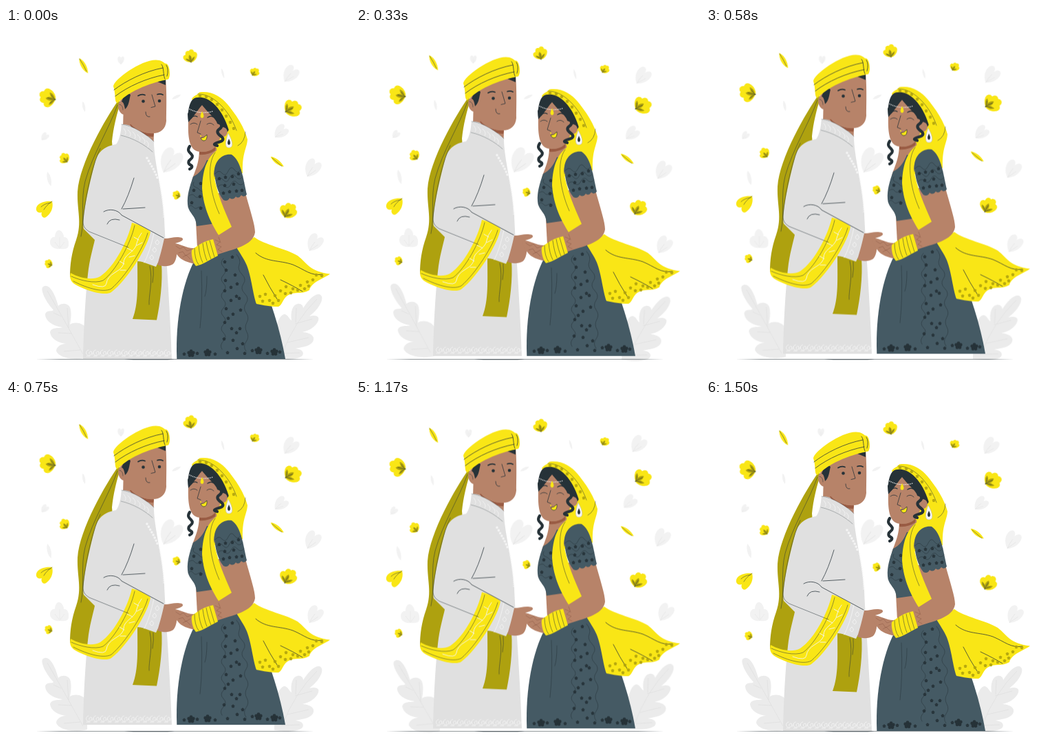
An HTML page that plays this animation: 500x500 px, repeating every 1.54 s.

```html
<!DOCTYPE html>
<html lang="en">
<head>
<meta charset="utf-8">
<title>Wedding couple</title>
<style>
html, body { margin: 0; height: 100%; overflow: hidden; background: #fff; }
svg { display: block; width: 100vw; height: 100vh; }
.sway { transform-origin: 250px 250px; animation: sway 1540ms linear infinite; }
.float { animation: float 1540ms linear infinite; }
@keyframes float {
  0%, 95%, 100% { transform: translateY(0); }
  46.75% { transform: translateY(-9.3px); }
}
@keyframes sway {
  0%, 97.4%, 100% { transform: rotate(0); }
  24.35% { transform: rotate(1.1deg); }
  73.05% { transform: rotate(-1.1deg); }
}
.yellow { fill: #f9e616; }
.olive { fill: #aea10f; }
.skin { fill: #b78369; }
.shade { fill: #995b43; }
.robe { fill: #e0e0e0; }
.dress { fill: #455a64; }
.dark { fill: #263238; }
.line, .fine, .lace, .beads { fill: none; stroke-linecap: round; stroke-linejoin: round; }
.line { stroke: #263238; stroke-width: .75; }
.fine { stroke: #263238; stroke-width: .5; }
.bold { stroke-width: 1.8; }
.curl { stroke-width: 4.2; }
.lace { stroke: #f4f4f4; stroke-width: .9; }
.beads { stroke-dasharray: 0 4.6; stroke-width: 3.6; }
.small { stroke-dasharray: 0 3; stroke-width: 1.8; }
.blooms { fill: none; marker: url(#bloom); }
.buds { fill: none; marker: url(#bud); }
.spots { fill: none; marker: url(#spot); }
</style>
</head>
<body>
<svg viewBox="0 0 500 500">
<defs>
  <g id="five">
    <circle cy="-2" r="1.5"/><circle cx="2" cy="-.6" r="1.5"/><circle cx="1.2" cy="1.7" r="1.5"/>
    <circle cx="-1.2" cy="1.7" r="1.5"/><circle cx="-2" cy="-.6" r="1.5"/><circle r="1"/>
  </g>
  <marker id="bloom" viewBox="-4 -4 8 8" markerWidth="13" markerHeight="13" markerUnits="userSpaceOnUse"><use href="#five" fill="#263238"/></marker>
  <marker id="bud" viewBox="-4 -4 8 8" markerWidth="5.6" markerHeight="5.6" markerUnits="userSpaceOnUse"><use href="#five" fill="#263238"/></marker>
  <marker id="spot" viewBox="-4 -4 8 8" markerWidth="5.4" markerHeight="5.4" markerUnits="userSpaceOnUse"><use href="#five" fill="#aea10f"/></marker>
  <g id="petal">
    <path class="yellow" d="M0 0C-6-1-13-5-13-10C-13-14-10-15-8-15C-9-20-5-23-1-21C1-25 8-24 8-18C13-18 14-13 12-9C10-4 5 0 0 0Z"/>
    <path class="olive" d="M0-1C-5-2-9-5-9-8C-5-8-1-5 0-1ZM0-1C-4-5-4-11-1-14C3-11 3-5 0-1ZM0-1C1-6 4-9 8-10C8-6 5-2 0-1Z"/>
    <path class="fine" d="M0 0Q-1-6 0-11M0 0Q-2-4-6-6M0 0Q2-5 5-7"/>
  </g>
  <g id="heart">
    <path d="M0 0C-8-5-11-14-8-20C-5-25 0-22 0-17C2-24 8-24 9-18C10-11 6-4 0 0Z"/>
    <path fill="none" stroke="#e5e5e5" stroke-width=".6" d="M0 0Q-1-7 0-13M0-1Q3-7 5-12"/>
  </g>
  <path id="sliver" d="M0-12C6-5 5 5 1 12C-5 6-5-6 0-12Z"/>
</defs>

<g class="sway">
  <g fill="#f2f2f2">
    <use href="#heart" transform="translate(405 78) rotate(37) scale(1.15)"/>
    <use href="#heart" transform="translate(229 210) rotate(30) scale(1.65)"/>
    <use href="#heart" transform="translate(391 159) rotate(46) scale(.98)"/>
    <use href="#heart" transform="translate(438 216) rotate(30) scale(1.2)"/>
    <use href="#heart" transform="translate(441 324) rotate(32) scale(1.18)"/>
    <use href="#heart" transform="translate(52 163) rotate(40) scale(.55)"/>
    <use href="#heart" transform="translate(167 53) scale(.52)"/>
    <path d="M78 321C70 322 63 317 64 310C65 304 70 303 71 304C71 297 75 293 78 294C82 296 84 300 84 304C89 303 92 309 91 316C91 321 84 322 78 321Z"/>
    <path fill="none" stroke="#e5e5e5" stroke-width=".6" d="M78 321V304M77 319L71 311M79 319L85 311"/>
    <use href="#sliver" transform="translate(62.5 219.500) rotate(-12) scale(.7 .9)"/>
    <use href="#sliver" transform="translate(113 114.500) rotate(-10) scale(.5 .65)"/>
    <use href="#sliver" transform="translate(315 66) rotate(-14) scale(.4 .62)"/>
    <use href="#sliver" transform="translate(247.500 100) rotate(65) scale(.5 .6)"/>
  </g>
  <g fill="#ebebeb">
    <path d="M56 375C66 373 73 393 76 404C80 400 89 399 93 406C96 414 94 424 93 431C101 426 113 429 118 438V479C102 484 76 480 73 469C74 460 86 458 91 459C77 459 65 452 64 442C66 434 79 437 82 435C67 433 57 425 57 416C59 409 67 413 69 410C60 401 48 380 54 376Z"/>
    <path d="M455 387C464 389 459 405 441 419C452 416 458 420 452 429C446 438 437 440 431 442C444 443 450 449 446 456C440 464 427 464 421 466C432 467 434 473 430 477C420 483 405 482 390 480V444C394 430 397 418 404 416C410 416 412 424 415 425C413 412 417 402 424 401C429 400 432 404 432 407C440 395 447 387 455 387Z"/>
    <path fill="none" stroke="#dedede" stroke-width=".7" d="M60 382Q85 425 112 474M69 414L80 419M76 443L95 444M84 470L108 468M89 407L91 436M452 394Q420 425 401 474M422 407L421 428M445 423L420 430M440 450L409 457M427 472L403 473"/>
  </g>
</g>

<path class="dark" d="M43 481.500L80 481.200H410L448 481.500L410 481.800H245L235 482.300H185L172 481.800H80Z"/>

<g class="float">
  <use href="#petal" transform="translate(72 104) rotate(-78) scale(1.04)"/>
  <use href="#petal" transform="translate(406 122) rotate(62) scale(1.04)"/>
  <use href="#petal" transform="translate(269 50) rotate(-8) scale(.8)"/>
  <use href="#petal" transform="translate(405 275) rotate(30) scale(.98)"/>
  <use href="#petal" transform="translate(89 195) rotate(-37) scale(.62)"/>
  <use href="#petal" transform="translate(253 245) rotate(-68) scale(.5)"/>
  <use href="#petal" transform="translate(67 345) rotate(-66) scale(.5)"/>
  <use href="#petal" transform="translate(358 69) rotate(35) scale(.54)"/>
  <g class="yellow">
    <path d="M67 252C70 263 63 272 58 275C54 278 50 272 52 268C45 270 42 264 45 259C49 253 59 251 67 252Z"/>
    <use href="#sliver" transform="translate(112.500 55) rotate(-28) scale(.9 1.050)"/>
    <use href="#sliver" transform="translate(394 194.500) rotate(-51) scale(.75 1)"/>
  </g>
  <path class="fine" d="M67 252Q59 257 55 264M65 254Q56 255 51 260M107 45Q113 54 117 63M387 189L401 201"/>

  <!-- groom -->
  <path class="olive" d="M164 104C145 131 107 196 104 238C103 266 111 282 102 308C95 328 93 344 93 362L128 370L160 240L154 165C156 145 161 125 166 110Z"/>
  <path class="fine" d="M162 112C150 146 126 183 115 223C108 252 115 275 109 303"/>
  <path class="skin" d="M171 106L170 146L190 164L214 180L215 154Z"/>
  <path class="robe" d="M168 140C182 139 205 153 215 166C215 192 227 236 230 276C231 310 239 410 241 481H112C113 430 116 385 119 358C121 337 127 318 129 308L113 292C110 280 117 242 129 197C134 177 145 172 160 169C165 163 167 151 168 140Z"/>
  <path class="shade" d="M182 139C193 151 205 154 215 153L214 158C200 158 186 150 180 141Z"/>
  <path class="robe" d="M168 140C184 141 206 156 215 165L213 180C200 170 185 161 167 156Z"/>
  <path class="fine" stroke-opacity=".6" d="M168 140C184 141 206 156 215 165M167 156C185 160 202 170 213 180"/>
  <path class="lace" d="M171 146q5 6 2 9m4-7q6 5 3 9m4-6q6 5 3 10m4-6q6 5 3 9m4-5q6 5 3 9m3-4q5 4 2 9" stroke-dasharray="3 1"/>
  <path class="lace beads" d="M205 189C211 200 217 209 221 220"/>
  <path class="lace small" d="M223 224C227 244 229 260 229 276"/>
  <path class="lace" id="hem"/>

  <path class="olive" d="M191 339L226 342C228 370 224 400 219 424.500L184 423C193 400 191 370 191 339Z"/>
  <path class="fine" d="M209 346C214 368 207 390 208 402M214 347Q215 358 213 370"/>
  <path class="robe" d="M185 281L230 305C229 321 223 337 218 347L187 336Z"/>
  <path class="lace" d="M215 298Q209 326 201 341M220 308q-6 4 0 7q5-3 0-7m-4 11q-6 4 0 7q5-3 0-7m-4 11q-6 4 0 7q5-3 0-7"/>
  <path class="skin" d="M230 306C240 306 246 302 256 305C260 309 252 311 246 313C250 320 249 337 243 343C235 348 225 346 220 344C224 331 227 320 230 306Z"/>

  <path class="yellow" d="M183 283C190 284 204 291 210 296C207 317 177 366 153 384C143 391 109 379 98 371C92 366 93 360 94 356C108 364 126 367 137 361C158 347 177 309 183 283Z"/>
  <path class="fine" d="M187 287C181 314 159 354 141 367C129 372 108 367 95 361M206 298C200 320 174 361 153 379C140 386 113 376 98 368"/>
  <path class="lace" d="M197 298q-6 8-7 15t-10 14t-9 14t-12 14t-13 16t-20 2M193 308l-7-4m4 12l8-4m-14 12l-8-4m3 13l8-2m-15 12l-7-4m1 13l8 0"/>
  <path class="fine" d="M137 175C123 205 114 254 112 281C112 289 115 292 121 296L178 319"/>
  <path class="line" d="M186 218Q178 245 168 263M142 267C150 262 163 264 168 272L229 305M147 285Q151 275 165 279M170 263Q188 262 202 261"/>

  <path class="skin" d="M171 98L180 80L232 70C234 100 233 118 233 135C232 148 223 154 211 153C192 152 178 141 173 126C164 126 160 112 166 106Z"/>
  <path class="dark" d="M168 107L174 92L181 97C179 104 179 113 173 118C172 112 171 108 168 107ZM220 78V70H232V83Q225 80 220 78Z"/>
  <path class="fine" d="M165 111Q170 112 170 119"/>
  <path class="yellow" d="M156 85C156 75 197 46 218 46.500C226 46.500 229 50 231 51.500C238 50 240 70 236 74.500C224 77 187 85 162 109C157 108 160 96 156 85Z"/>
  <path class="line" d="M157 90C174 77 201 63 228 58M159 99C177 85 204 73 230 68M226 53C230 57 228 69 231 74M233 54Q237 60 234 70"/>
  <circle class="dark" cx="199.500" cy="106.500" r="2.300"/><circle class="dark" cx="223" cy="106" r="2.300"/>
  <path class="line bold" d="M192 98.500Q197 95.500 202 97.500M220 96.500Q224 95 228 97"/>
  <path class="line" d="M212 97L217 114L211 115.500M203 122Q203 130 209 129"/>

  <!-- bride -->
  <path class="yellow" d="M270 103C277 92 302 91 318 107C335 125 347 146 351 162C350 176 343 181 344 211L303 220L300 170Z"/>
  <path class="skin" d="M281 174H306L308 215L270 222C275 206 281 198 281 174Z"/>
  <path class="shade" d="M281 179Q293 183 305 170L304 178Q294 185 281 184Z"/>
  <path class="skin" d="M276 282L306 280L330 320L278 320Z"/>
  <path class="dress" d="M292 192C287 204 281 212 272 216C267 230 263 243 264 256C265 270 276 271 277 288L305 284L302 192Z"/>
  <path class="dress" d="M274 338L338 314L365 350C384 392 399 440 406 481H248.300C246 424 257 369 274 338Z"/>
  <path class="fine" d="M273 224q-3 5 2 7t6 4t6 3M266 244q5-4 8 0t7 1t6 3M265 260q4-4 7 0t7 1t7 1"/>
  <path class="buds" d="M283 226L273 236L282 245L270 254L283 262"/>
  <path class="fine" d="M284 353Q286 400 282 436M292 361Q292 382 289 390M316 335q-6 6 0 12t0 12t0 12t0 12t0 12t0 12t0 12t0 12t0 12t0 12t-2 12M335 329q7 8 4 15t4 14t2 14t2 14t2 14t0 14t1 14t0 14t-1 14t0 14"/>
  <path class="buds" d="M318 340L329 333L320 352L333 359L319 367L336 372L318 382L327 396L339 393L320 408L330 416L341 410L318 428L328 437L340 437L317 452L330 454L344 459L322 472L336 466"/>
  <path class="buds" d="M327 377L335 390L323 422L335 443L347 473L278 473L304 474L259 474L398 471L358 469L380 473"/>
  <path class="blooms" d="M269 473L293 472L367 469L390 471"/>

  <path class="yellow" d="M334 317L361 304C375 315 408 321 424 331C437 341 441 354 471 357.500C462 364 444 369 441 381C430 388 419 382 409 389C402 394 402 402 396 405C383 405 375 403 364 401C359 388 357 363 350 345C346 335 340 328 334 317Z"/>
  <path class="line" d="M363 327C379 341 397 337 417 344C434 351 443 361 460 358M399 366Q418 375 431 383M374 359Q383 377 394 394"/>
  <path class="spots" d="M369 390L377 387L373 397L383 396L391 389L396 396L399 382L407 376L406 386L417 379L424 381L428 374L434 379L438 369L446 366L451 359L459 360L388 400L414 385L440 375"/>

  <path class="skin" d="M304 240L348 240C355 266 362 286 362 297C359 317 330 321 306 330L300 307L320 291Z"/>
  <path class="skin" d="M274 320C264 321 252 313 244 313C240 316 243 322 249 330C255 338 264 341 276 343Z"/>
  <path class="fine" stroke-opacity=".7" style="stroke:#7b4a3a" d="M247 317l6 4l5-3l5 6l6-2M251 327l6-2l4 6l7-4M257 333l5-3l6 6M304 308l7 3l-5 4l7 3l-5 4l6 3M309 304l3 8"/>
  <path class="yellow" d="M270 323C279 315 290 309 301 307L308 331C296 337 286 344 276 346C271 340 269 329 270 323Z"/>
  <path class="fine" d="M274 320Q274 336 280 344M280 316Q281 332 286 341M286 313Q288 329 292 338M291 311Q294 327 298 336M296 309Q300 323 303 333"/>

  <path class="yellow" d="M312 174C293 185 286 203 285 233C287 263 299 285 309 301L328 289C318 266 306 240 302 212C304 193 313 184 327 183L340 188L343 174Z"/>
  <path class="dress" d="M303 211C302 192 316 182 328 184C342 193 345 220 350 242q-4 5-8 1q-4 6-8 2q-4 6-9 2q-3 6-9 3C307 239 304 223 303 211Z"/>
  <path class="fine" d="M304 212q5-7 10-1t9-3t9-2t9 0M306 222q5-7 10-1t9-3t9-2t10 0M308 231q5-6 10-1t9-3t9-2t10 0"/>
  <path class="buds" d="M310 219L319 217L329 216L338 212L316 240L325 238L335 237L343 236L318 229L331 227"/>
  <path class="fine" d="M304 181C291 198 296 239 310 270M348 151Q347 166 337 171"/>

  <path class="dark" d="M269 107C277 94 301 96 315 112C329 126 330 140 322 151L306 148L265 135C264 125 265 115 269 107Z"/>
  <path class="skin" d="M265 134C270 128 279 118 285 112C292 121 302 127 311 131L313 144C319 143 325 149 320 156C316 160 313 157 312 156C309 173 298 181 284 180C267 180 264 163 265 134Z"/>
  <path class="dark" d="M264 125Q270 107 286 109Q276 125 265 137ZM284 109C299 108 313 123 314 142L307 139C305 130 292 124 284 109Z"/>
  <path class="line curl" d="M311 137q5 6-1 10t2 10t-3 9t-2 5M267 172c-4 6-1 8 2 11s2 6-1 8s-4 6 0 8s2 5-1 6"/>
  <path class="yellow" d="M271 103C294 93 316 119 325 152L343 150C333 122 314 89 281 93.500Z"/>
  <path class="fine" d="M279 96C301 95 325 120 335 149"/>
  <path class="spots" d="M282 99L291 100L299 104L307 111L314 119L320 128L326 137L331 146"/>
  <path class="beads" style="stroke:#f5f5f5;stroke-width:1.500;stroke-dasharray:0 2.400" d="M267 118Q283 126 301 121"/>
  <path class="yellow" d="M285 121Q290 130 285 131Q280 130 285 121Z"/>
  <path class="line" style="stroke-width:1.400" d="M269 131Q273 126 278 129M293 130Q299 126 304 131"/>
  <path class="line" d="M268 140Q273 136 278 140M292 140Q297 136 302 141M283 135L278 152L283 154"/>
  <path class="yellow" stroke="#263238" stroke-width=".7" d="M283 160Q288 160 292 155Q293 164 287 164Q284 163 283 160Z"/>
  <circle class="yellow" cx="283" cy="157" r="1"/>
  <path fill="#f5f5f5" stroke="#b7b7b7" stroke-width=".5" d="M323 153C330 165 331 174 324 174C317 174 319 164 323 153Z"/>
  <path class="dark" d="M324 161Q328 169 324 170Q320 169 324 161Z"/>
</g>
</svg>
<script>
// Curled lace along the bottom of the robe
let d = '';
for (let x = 117; x < 236; x += 10.3) {
  d += `M${x + 3} 468a4 4 0 1 0 4 2q-4 0-3 4M${x + 8} 475l2-4M${x} 477h5`;
}
document.getElementById('hem').setAttribute('d', d);
</script>
</body>
</html>
```
